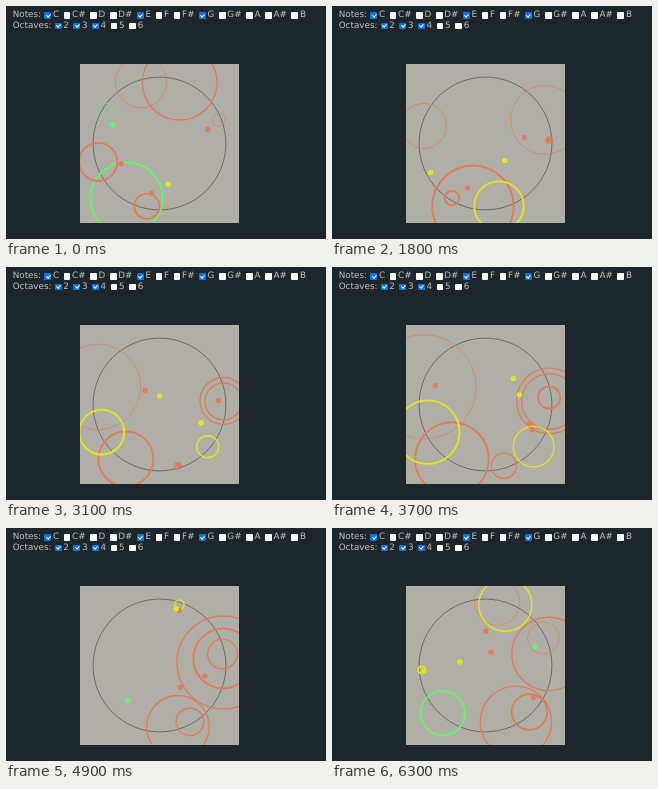
Recreate the animation shown at these times as an HTML page with a canvas. Size 320 by 233 pixels, loop 6.4 s.

```html
<!DOCTYPE html>
<html lang="en">
<head>
<meta charset="utf-8">
<title>Bouncing notes</title>
<style>
  html, body { margin: 0; width: 100%; height: 100%; overflow: hidden; background: #1d262b; }
  canvas { position: absolute; left: 0; top: 0; width: 320px; height: 233px; display: block; }
  #panel {
    position: absolute; left: 6.7px; top: 4.4px; color: #c3c2be; white-space: nowrap;
    font: 8.8px/10.4px "DejaVu Sans", sans-serif; text-rendering: geometricPrecision;
  }
  .row, .option { display: flex; align-items: center; }
  .option { margin-right: 4.5px; }
  .title { margin-right: 3.4px; }
  .box { position: relative; width: 6.8px; height: 6.8px; margin-right: 1.7px; border-radius: 1px; background: #fff; }
  .on { background: #0b74ec; }
  .on::after {
    content: ""; position: absolute; left: 2.2px; top: .8px; width: 1.5px; height: 3px;
    border: solid #fff; border-width: 0 1px 1px 0; transform: rotate(42deg);
  }
</style>
</head>
<body>
<canvas id="stage"></canvas>
<div id="panel"></div>
<script>
const LOOP = 6.4, STEP = 100;
const CX = 153.5, CY = 137.5, WALL_R = 66.4, HIT_R = 64;
const BALL_R = 2.7, RIPPLE_R = 3, GROWTH = 15.6;
const ORANGE = '#db7f5d', GREEN = '#69f069', YELLOW = '#e3e51c';

// A ball is born in the centre and flies straight, at constant speed, from one
// wall angle (degrees) to the next. The octave of each hit sets its ripple width.
const balls = [
  { color: GREEN, born: -3.4, until: .45, speed: 50, octaves: '244', hits: [121, 210.4, 90] },
  { color: ORANGE, born: -2.99, speed: 80.8, octaves: '32433344', hits: [-71.6, 101.3, 195.9, -2.7, 73.3, -10.4, -79.6, 37.7] },
  { color: ORANGE, born: -2.37, speed: 69.7, octaves: '4422344', hits: [-106.7, -21.7, 121.6, -6.3, 61.6, -25.4, -140.7] },
  { color: ORANGE, born: -2.09, until: 4.45, speed: 60.3, octaves: '24344', hits: [163.3, 77.4, -3.2, -161.3, -.5] },
  { color: YELLOW, born: -.76, until: 4.45, speed: 54.8, octaves: '2234', hits: [77.8, 154.4, -38.6, 175] },
  { color: YELLOW, born: 1.27, speed: 48.5, octaves: '334', hits: [41.2, -71.9, 148.9] },
  { color: GREEN, born: 4.39, speed: 93, octaves: '24', hits: [131.8, -23] },
  { color: ORANGE, born: 4.5, speed: 75, octaves: '24', hits: [46.6, -112] },
  { color: YELLOW, born: 5.47, speed: 80, octaves: '24', hits: [176, 20] }
];

function tracePath(ball) {
  let last = { t: ball.born, x: CX, y: CY };
  ball.path = [last];
  ball.hits.forEach((degrees, i) => {
    const a = degrees * Math.PI / 180;
    const x = CX + HIT_R * Math.cos(a), y = CY + HIT_R * Math.sin(a);
    const t = last.t + Math.hypot(x - last.x, y - last.y) / ball.speed;
    last = { t, x, y, width: 2.9 - .5 * ball.octaves[i] };
    ball.path.push(last);
  });
  // Fast balls hit harder, so their ripples travel further.
  ball.reach = Math.max(37, .65 * ball.speed);
}

function drawPanel() {
  const option = label => {
    const on = label[0] === '+';
    return `<span class="option"><i class="box${on ? ' on' : ''}"></i>${label.slice(on)}</span>`;
  };
  const row = (title, labels) =>
    `<div class="row"><span class="title">${title}:</span>${labels.split(' ').map(option).join('')}</div>`;
  document.getElementById('panel').innerHTML =
    row('Notes', '+C C# D D# +E F F# +G G# A A# B') + row('Octaves', '+2 +3 +4 5 6');
}

const stage = document.getElementById('stage');
const ctx = stage.getContext('2d');
const dpr = window.devicePixelRatio || 1;
stage.width = 320 * dpr;
stage.height = 233 * dpr;

function circle(x, y, r) {
  ctx.beginPath();
  ctx.arc(x, y, r, 0, Math.PI * 2);
}

function ring(x, y, r, width, color) {
  circle(x, y, r);
  ctx.globalAlpha = Math.min(1, .4 + width * .42);
  ctx.lineWidth = width;
  ctx.strokeStyle = color;
  ctx.stroke();
  ctx.globalAlpha = 1;
}

function drawRipples({ color, reach, path }, time) {
  for (const { t, x, y, width } of path.slice(1)) {
    const r = RIPPLE_R + (time - t) * GROWTH;
    if (time >= t && r < reach) ring(x, y, r, width, color);
  }
}

function drawBall({ color, path }, time) {
  const next = path.findIndex(p => p.t > time);
  const a = path[next - 1], b = path[next];
  const k = (time - a.t) / (b.t - a.t);
  circle(a.x + (b.x - a.x) * k, a.y + (b.y - a.y) * k, BALL_R);
  ctx.fillStyle = color;
  ctx.fill();
}

function draw(time) {
  ctx.setTransform(dpr, 0, 0, dpr, 0, 0);
  ctx.clearRect(0, 0, 320, 233);
  ctx.save();
  ctx.beginPath();
  ctx.rect(74, 58, 159, 159);
  ctx.fillStyle = '#b0afa7';
  ctx.fill();
  ctx.clip();
  ring(CX, CY, WALL_R, 1, '#5c5c55');
  const alive = balls.filter(({ born, until = LOOP }) => time >= born && time < until);
  alive.forEach(ball => drawRipples(ball, time));
  alive.forEach(ball => drawBall(ball, time));
  ctx.restore();
}

const begin = performance.now();
function tick() {
  // The picture advances in steps of a tenth of a second.
  const elapsed = (performance.now() - begin) % (LOOP * 1000);
  draw(Math.floor(elapsed / STEP) * STEP / 1000);
  requestAnimationFrame(tick);
}

balls.forEach(tracePath);
drawPanel();
tick();
</script>
</body>
</html>
```
